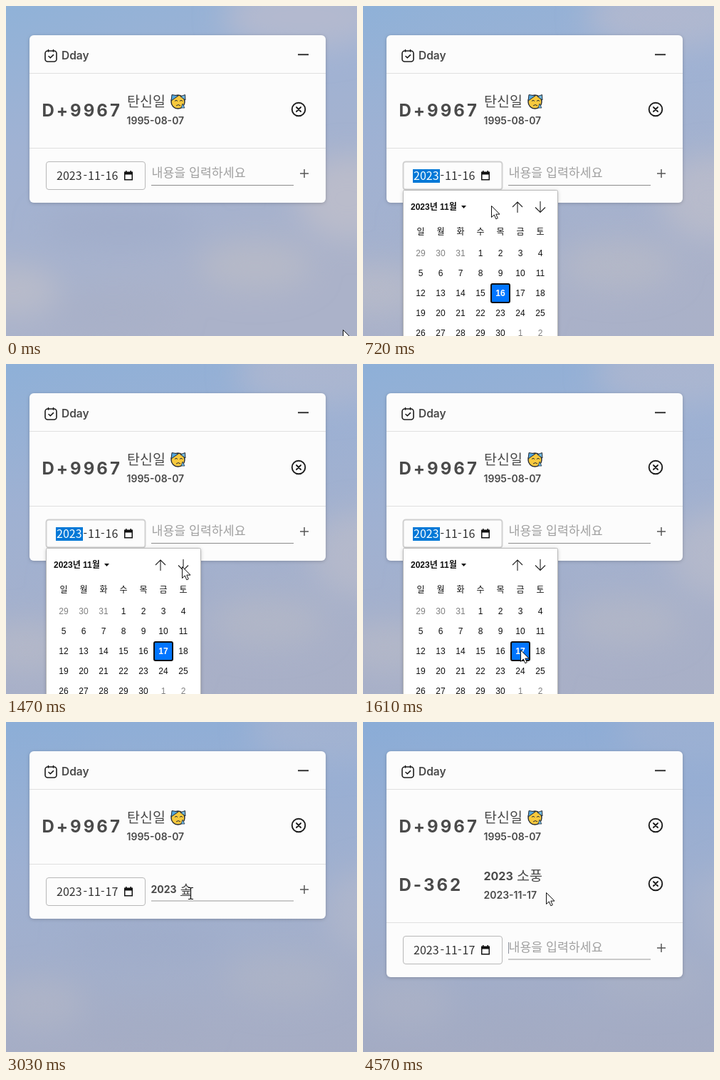
These frames come from a looping animation (493 px wide and 463 px high, 4910 ms). An HTML page:

```html
<!DOCTYPE html>
<html lang="ko">
<head>
<meta charset="utf-8">
<title>Dday</title>
<style>
  html, body { margin: 0; width: 100%; height: 100%; overflow: hidden; }
  svg { display: block; }
  text { font-family: Inter, "Noto Sans CJK KR", "Noto Sans CJK JP", sans-serif; fill: #4a4a4a; white-space: pre; }
  .ko { font-family: "Noto Sans CJK KR", "Noto Sans CJK JP", "Noto Sans CJK", sans-serif; }
  .count { font-size: 24px; font-weight: 700; letter-spacing: 3px; }
  .title { font-size: 16px; font-weight: 700; }
  .title.ko { font-size: 19.5px; font-weight: 500; }
  .day { font-size: 14px; font-weight: 600; }
  .field { font-size: 16px; fill: #303030; }
  .hint { font-size: 17.3px; font-weight: 300; fill: #a0a0a0; }
  .typed { font-size: 14px; font-weight: 700; }
  .typed.ko { font-size: 17.3px; font-weight: 400; }
  #cal text { font: 12px "Liberation Sans", "Noto Sans CJK KR", "Noto Sans CJK JP", sans-serif; fill: #101010; text-anchor: middle; }
  #cal .month { font-weight: 700; text-anchor: start; }
  #cal .other { fill: #808080; }
  #cal .on { fill: #fff; font-weight: 700; }
  .line { fill: none; stroke: #1c1c1c; stroke-linecap: round; stroke-linejoin: round; }
</style>
</head>
<body>
<svg width="493" height="463" viewBox="0 0 493 463">
  <defs>
    <linearGradient id="sky" x1="0" y1="0" x2=".3" y2="1">
      <stop offset="0" stop-color="#90b2d8"/>
      <stop offset=".4" stop-color="#a0b2d3"/>
      <stop offset="1" stop-color="#abb2c9"/>
    </linearGradient>
    <linearGradient id="dusk" x1="0" y1="0" x2="0" y2="1">
      <stop offset="0" stop-color="#86a8d6"/>
      <stop offset=".5" stop-color="#9aadcf"/>
      <stop offset="1" stop-color="#9fa6be"/>
    </linearGradient>
    <filter id="soft" x="-30%" y="-30%" width="160%" height="160%"><feGaussianBlur stdDeviation="20"/></filter>
    <filter id="shade" x="-10%" y="-10%" width="120%" height="120%"><feDropShadow dx="0" dy="1" stdDeviation="2.5" flood-opacity=".2"/></filter>
    <g id="remove" class="line" stroke-width="1.9">
      <circle r="9.3"/>
      <path d="M-3-3 3 3M3-3-3 3"/>
    </g>
  </defs>

  <rect width="493" height="463" fill="url(#sky)"/>
  <g id="clouds" filter="url(#soft)">
    <ellipse cx="420" cy="15" rx="115" ry="48" fill="#b3b9cf"/>
    <ellipse cx="480" cy="270" rx="70" ry="60" fill="#babccb"/>
    <ellipse cx="350" cy="365" rx="80" ry="34" fill="#b6b9c8"/>
    <ellipse cx="10" cy="400" rx="65" ry="36" fill="#b8bbca"/>
    <ellipse cx="160" cy="310" rx="110" ry="26" fill="#a1adca"/>
    <ellipse cx="150" cy="430" rx="90" ry="24" fill="#a8b0c8"/>
  </g>
  <rect id="dim" width="493" height="463" fill="url(#dusk)"/>

  <rect id="card" x="33" y="41" width="416" height="235" rx="6" fill="#fcfcfc" filter="url(#shade)"/>
  <path d="M33 94.5H449" stroke="#e0e0e0"/>
  <g class="line" stroke-width="1.6">
    <rect x="55" y="63" width="16" height="15" rx="3.5"/>
    <path d="M59.5 61.5V64M66.5 61.5V64M60 70.5 62.3 72.8 66.5 68.6"/>
  </g>
  <text x="78" y="75" font-size="15.5" font-weight="600">Dday</text>
  <path d="M410 68.2H425" stroke="#333" stroke-width="2"/>

  <text class="count" x="50.5" y="154.5">D+9967</text>
  <text class="title ko" x="170" y="140.5">탄신일</text>
  <g stroke="#262b33" stroke-linejoin="round">
    <circle cx="241.5" cy="134.5" r="9.5" fill="#f7c93e" stroke-width="1.4"/>
    <path d="M232 133 233 124.5 242 126Z" fill="#53a6dd"/>
    <path d="M245 127 251.5 124.5 252 132Z" fill="#71b8df"/>
    <path d="M237 133.5q2-2.5 4 0M244 133.5q2-2.5 4 0M239 140q3-3 6 0" fill="none"/>
    <path d="M248 137 251 143 246 143Z" fill="#69b4e5" stroke-width=".7"/>
  </g>
  <text class="day" x="169.5" y="166">1995-08-07</text>
  <use href="#remove" x="411" y="145"/>

  <g id="added">
    <text class="count" x="50.5" y="236.5">D-362</text>
    <text class="title" x="169.5" y="222">2023</text>
    <text class="title ko" x="216" y="222.5">소풍</text>
    <text class="day" x="169.5" y="248">2023-11-17</text>
    <use href="#remove" x="411" y="227"/>
  </g>

  <g id="form">
    <path d="M33 199.5H449" stroke="#e0e0e0"/>
    <rect id="box" x="56.5" y="218.5" width="139" height="39" rx="3.5" fill="none"/>
    <rect id="mark" x="70" y="229" width="38" height="19" fill="#0078d7"/>
    <text class="field ko" id="year" x="71" y="244">2023</text>
    <text class="field ko" x="108.5" y="244">-</text>
    <text class="field ko" x="115" y="244">11</text>
    <text class="field ko" x="133" y="244">-</text>
    <text class="field ko" id="dd" x="139.5" y="244">16</text>
    <path d="M166 232.5h2v-1.5h1.5v1.5h5v-1.5h1.5v1.5h2V244.500h-12zM167.500 236.500V243h9V236.500z" fill="#111" fill-rule="evenodd"/>
    <text class="hint ko" id="hint" x="204.5" y="240">내용을 입력하세요</text>
    <text class="typed" id="num" x="203.5" y="240"></text>
    <text class="typed ko" id="word" x="245" y="240.5"></text>
    <path id="compose" stroke="#444"/>
    <path id="caret" stroke="#8a8f9a"/>
    <path id="under"/>
    <path d="M413 235H425M419 229V241" stroke="#555" stroke-width="1.5"/>
  </g>

  <g id="cal">
    <rect x="56.500" y="258.500" width="217" height="240" rx="2" fill="#fff" stroke="#b8b8b8" filter="url(#shade)"/>
    <text class="month" x="67" y="286">2023년 11월</text>
    <path d="M138 280H145L141.500 284Z" fill="#101010"/>
    <path d="M217 290V275M210 282 217 275 224 282M249 274V289.500M242 282.500 249 289.500 256 282.500" fill="none" stroke="#222" stroke-width="1.1"/>
    <rect id="pick" y="390" width="26" height="26" rx="2" fill="#0075ff" stroke="#101010" stroke-width="2"/>
  </g>

  <path id="arrow" d="M0 0V16L3.800 12.500 6.300 18.300 8.800 17.200 6.300 11.600H11.500Z" fill="#fff" stroke="#111"/>
  <path id="beam" d="M-3.500-8H-1L0-7 1-8H3.500M0-7V7M-3.500 8H-1L0 7 1 8H3.500" fill="none" stroke="#111" stroke-width="1.200"/>
</svg>
<script>
const LOOP = 4910;
const $ = id => document.getElementById(id);
const show = (id, on) => $(id).style.display = on ? '' : 'none';
const set = (id, attrs) => { for (const k in attrs) $(id).setAttribute(k, attrs[k]); };
const at = (list, t) => list.filter(e => e[0] <= t).pop();

// time, x, y, and 1 for the text cursor
const path = [
  [0, 473, 454], [70, 452, 432], [140, 396, 382], [210, 318, 318], [270, 242, 260],
  [340, 215, 240, 1], [400, 182, 238], [670, 181, 262], [720, 180, 280], [810, 186, 302],
  [870, 193, 322], [940, 214, 350], [1000, 233, 373], [1070, 224, 398], [1280, 230, 372],
  [1340, 238, 335], [1410, 244, 304], [1470, 247, 284], [1550, 233, 350], [1610, 221, 401],
  [1750, 235, 322], [1820, 250, 254], [1880, 259, 240, 1], [4100, 257, 239]
];

const typing = [
  [0, '', ''], [1950, '2', ''], [2010, '20', ''], [2080, '202', ''], [2150, '2023', ''],
  [2370, '2023 ', ''], [2480, '2023', 'ㅅ'], [2580, '2023', '소'], [2960, '2023', '솦'],
  [3170, '2023', '소푸'], [3310, '2023', '소풍'], [4100, '', '']
];

// start, end, number of steps in each burst
const bursts = [[70, 530, 8], [610, 1070, 8], [1150, 1670, 9], [1750, 2150, 7], [2890, 3030, 3], [3710, 4170, 8]];
const ticks = [[0]];
for (const [a, b, n] of bursts)
  for (let i = 0; i < n; i++) ticks.push([Math.floor((a + (b - a) * i / (n - 1)) / 10) * 10]);

function label(x, y, str, cls) {
  const el = document.createElementNS('http://www.w3.org/2000/svg', 'text');
  el.setAttribute('x', x);
  el.setAttribute('y', y);
  el.setAttribute('class', cls);
  el.textContent = str;
  $('cal').append(el);
  return el;
}

[...'일월화수목금토'].forEach((d, i) => label(81 + 28 * i, 321, d, ''));
const days = {};
for (let i = 0; i < 35; i++) {
  const n = i - 2, inside = n > 0 && n <= 30;
  const el = label(81 + 28 * (i % 7), 351 + 28 * Math.floor(i / 7),
    n < 1 ? n + 31 : n > 30 ? n - 30 : n, inside ? '' : 'other');
  if (inside) days[n] = el;
}

function draw(t) {
  const sky = at(ticks, t)[0] / LOOP;
  set('clouds', { transform: `translate(${60 * sky} ${-8 * sky})` });
  set('dim', { opacity: .65 * sky });

  const done = t >= 4100;
  set('card', { height: done ? 317 : 235 });
  set('form', { transform: `translate(0 ${done ? 82 : 0})` });
  show('added', done);

  const open = t >= 610 && t < 1670;
  const hover = t >= 400 && t < 610;
  show('cal', open);
  show('mark', open);
  $('year').style.fill = open ? '#fff' : '';
  $('dd').textContent = t < 1670 ? 16 : 17;
  set('box', { stroke: open ? '#d0d0d0' : hover ? '#212121' : '#b8b8b8', 'stroke-width': open ? 2 : 1 });

  const sel = t < 1070 ? 16 : 17;
  set('pick', { x: sel === 16 ? 180 : 208 });
  for (const n of [16, 17]) days[n].setAttribute('class', n === sel ? 'on' : '');

  const [, num, word] = at(typing, t);
  $('num').textContent = num;
  $('word').textContent = word;
  show('hint', !num);
  show('compose', word);
  set('compose', { d: `M${word.length > 1 ? 261 : 245} 243.500h15` });

  const focus = t >= 1880;
  const caret = focus && !word && (!done || t >= 4570);
  show('caret', caret);
  set('caret', { d: `M${204.5 + num.length * 9} 227v16` });
  set('under', {
    d: focus ? 'M204 251H404' : 'M204 251.500H404',
    stroke: focus ? '#cacaca' : '#8c8c8c',
    'stroke-width': focus ? 2 : 1
  });

  const [, x, y, text] = at(path, t);
  show('arrow', !text);
  show('beam', text);
  set(text ? 'beam' : 'arrow', { transform: `translate(${x + .5} ${y + .5})` });
}

function loop() {
  draw(performance.now() % LOOP);
  requestAnimationFrame(loop);
}
loop();
</script>
</body>
</html>
```
